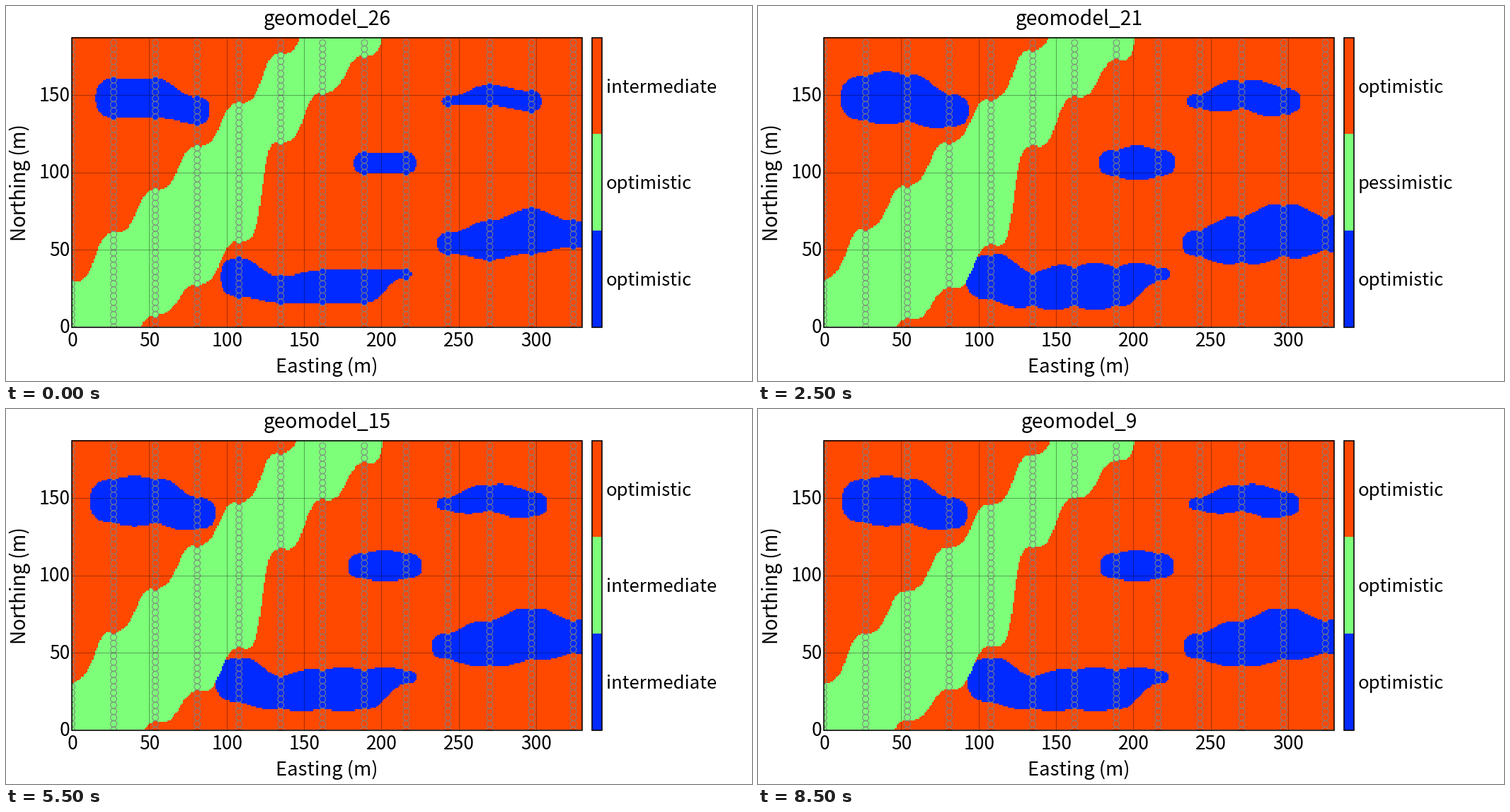
Recreate the animation shown at these times as a matplotlib script. Size 1054x531 px, loop 9 s.

```python
import numpy as np
import matplotlib.pyplot as plt
from matplotlib.animation import FuncAnimation
from matplotlib.colors import ListedColormap
from matplotlib.patches import Rectangle

W, H, DPI = 1054, 531, 64
PT = 72 / DPI                                # points per pixel
LEFT, RIGHT, TOP, BOTTOM = 93, 814, 44.5, 454.5
SCALE = 2.187                                # pixels per metre
EAST, NORTH = 330, 187.5                     # map size in metres
SPACING = 27                                 # metres between boreholes
BLUE, GREEN, ORANGE = range(3)
COLORS = ["#002aff", "#7dff7a", "#ff4800"]
STATES = ["optimistic", "intermediate", "pessimistic"]
FRAMES = 18

# A body is its first borehole and the cored (low, high) northing in each
# following one; values outside the map let a body run off the edge.
BAND = (0, [(-20, 28), (-20, 60), (8, 88), (28, 116), (56, 144),
            (120, 176), (152, 212), (176, 240), (240, 240)])
LENSES = [
    (1, [(136, 160), (136, 160), (132, 148)]),
    (4, [(20, 44), (16, 32), (16, 36), (16, 36), (32, 36)]),
    (7, [(100, 112), (100, 112)]),
    (9, [(144, 148), (144, 156), (140, 152)]),
    (9, [(48, 60), (44, 68), (48, 76), (52, 68), (52, 68)]),
]

cell_x = np.arange(EAST) + .5
cell_y = (NORTH - (np.arange(187) + .5) * NORTH / 187)[:, None]


def ease(t, jump):
    """S-curve that gets steeper for larger jumps."""
    n = 1.5 + jump / 40
    return t**n / (t**n + (1 - t)**n)


def body_mask(body, spread, lag=0):
    """Cells of a body that swells between its cores and has rounded ends."""
    first, cores = body
    cores = np.array(cores, float)
    last = len(cores) - 1
    pos = cell_x / SPACING - first
    i = np.clip(np.floor(pos), 0, last - 1).astype(int)
    t = np.clip(pos - i, 0, 1)
    wave = np.sin(np.pi * t)
    a, b = cores[i].T, cores[i + 1].T
    low, high = a + (b - a) * ease(t - lag * wave, abs(b - a))
    half = (high - low) / 2
    beyond = SPACING * np.maximum(0, np.maximum(-pos, pos - last))
    reach = 2 + .8 * half + 4.5 * spread
    cap = (1 - np.minimum(beyond / reach, 1)**2.5)**.4
    swell = .6 + 1.9 * spread + 2.6 * spread * wave
    return abs(cell_y - (low + high) / 2) < (half + swell) * cap


def digits(n):
    """States of the orange, green and blue units."""
    return n % 3, n // 3 % 3, n // 9


def model(n):
    orange, green, blue = digits(n)
    room = min(1, .8 * orange)               # space the orange unit gives up
    grid = np.full((len(cell_y), EAST), ORANGE)
    for lens in LENSES:
        grid[body_mask(lens, room * (1 - .2 * blue))] = BLUE
    grid[body_mask(BAND, room * min(1, 1.5 - .5 * green), lag=.05)] = GREEN
    return grid


def cored(body, hole, y):
    k = hole - body[0]
    return 0 <= k < len(body[1]) and body[1][k][0] <= y <= body[1][k][1]


def core_class(hole, y):
    if any(cored(lens, hole, y) for lens in LENSES):
        return BLUE
    return GREEN if cored(BAND, hole, y) else ORANGE


def east(m):
    return LEFT + m * SCALE


def north(m):
    return BOTTOM - m * SCALE


plt.rcParams["font.family"] = "Noto Sans CJK JP"
fig = plt.figure(figsize=(W / DPI, H / DPI), dpi=DPI, facecolor="white")
ax = fig.add_axes([0, 0, 1, 1])


def label(x, y, text="", size=25.7, ha="center", **kw):
    return ax.text(x, y, text, fontsize=size * PT, ha=ha, va="baseline",
                   color="black", **kw)


def frame_box(x0, x1):
    return ax.add_patch(Rectangle((x0, TOP), x1 - x0, BOTTOM - TOP, fill=False,
                                  ec="black", lw=1.6 * PT, zorder=5))


image = ax.imshow(model(0), extent=(LEFT, RIGHT, BOTTOM, TOP), vmin=0, vmax=2,
                  cmap=ListedColormap(COLORS), interpolation="nearest", aspect="auto")
ax.set(xlim=(0, W), ylim=(H, 0))
ax.axis("off")
box = frame_box(LEFT, RIGHT)

samples = [(hole, y) for hole in range(13) for y in range(0, 185, 4)]
dots = ax.scatter([east(hole * SPACING) for hole, _ in samples],
                  [north(y) for _, y in samples], s=(8.8 * PT)**2,
                  c=[COLORS[core_class(*sample)] for sample in samples],
                  edgecolors="#808080", linewidths=PT, zorder=3)
dots.set_clip_path(box)

grid_style = dict(color="black", alpha=.38, lw=.9 * PT, zorder=4)
for m in range(0, 301, 50):
    label(east(m) + .5, 481.5, str(m), 26.3)
    if m:
        ax.plot([east(m)] * 2, [TOP, BOTTOM], **grid_style)
for m in range(0, 151, 50):
    label(90.5, north(m) + 8.5, str(m), 26.3, ha="right")
    if m:
        ax.plot([LEFT, RIGHT], [north(m)] * 2, **grid_style)

label(453.5, 519, "Easting (m)", 27.4)
label(28, 250.5, "Northing (m)", 27.8, rotation=90, rotation_mode="anchor")
title = label(453.5, 27.5, size=28.2)

third = (BOTTOM - TOP) / 3
unit_labels = []
for i, color in enumerate(COLORS[::-1]):
    top = TOP + i * third
    ax.add_patch(Rectangle((828, top), 14, third, fc=color, lw=0))
    unit_labels.append(label(848, top + third / 2 + 9.7, ha="left"))
frame_box(828, 842)


def update(n):
    image.set_data(model(n))
    title.set_text(f"geomodel_{26 - n}")
    # The legend runs one model ahead of the map
    for text, state in zip(unit_labels, digits((n + 1) % FRAMES)):
        text.set_text(STATES[state])
    return [image, title, *unit_labels]


animation = FuncAnimation(fig, update, frames=FRAMES, interval=500,
                          repeat=True, repeat_delay=0, blit=False)
plt.show()
```
